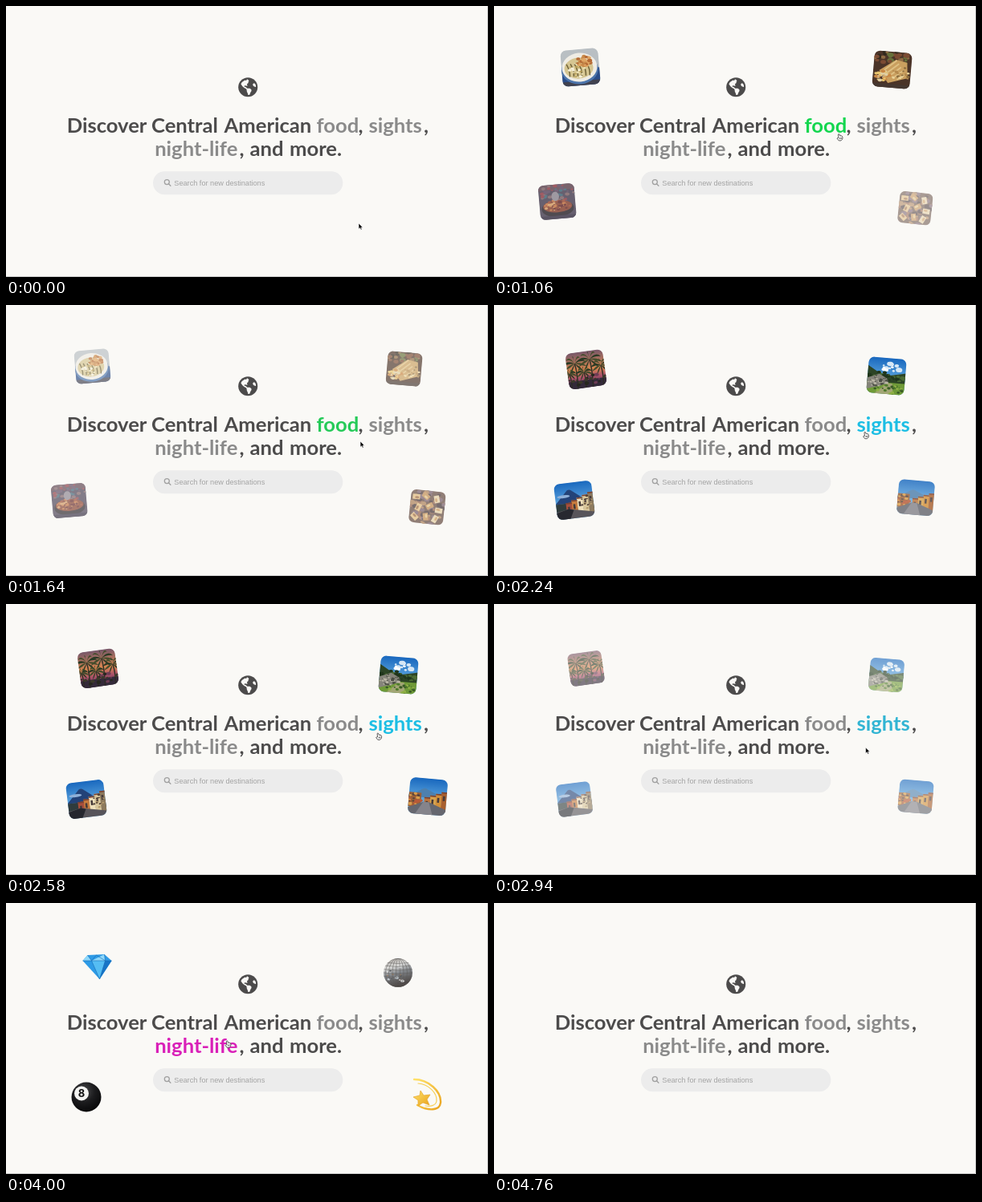
These frames come from a looping animation (600x338 px, 5 s). An HTML page:

```html
<!DOCTYPE html>
<html lang="en">
<head>
<meta charset="utf-8">
<title>Discover</title>
<style>
  html, body { margin: 0; width: 100%; height: 100%; overflow: hidden; background: #faf9f6; }
  svg { display: block; width: 600px; height: 338px; }
  .title { font: 700 25.6px Lato, sans-serif; fill: #4c4b4b; }
  .hint { font: 9.16px "Liberation Sans", Arial, sans-serif; fill: #a3a3a3; }
</style>
</head>
<body>
<svg viewBox="0 0 600 338">
  <defs>
    <clipPath id="card"><rect x="-23.5" y="-22.5" width="47" height="45" rx="7"/></clipPath>
    <clipPath id="ball"><circle r="18"/></clipPath>
    <linearGradient id="sunset" x2="0" y2="1">
      <stop stop-color="#75566a"/><stop offset=".5" stop-color="#d98650"/><stop offset=".72" stop-color="#a9506a"/><stop offset="1" stop-color="#3a2c40"/>
    </linearGradient>
    <linearGradient id="sky" x2="0" y2="1"><stop stop-color="#1766bd"/><stop offset=".7" stop-color="#6cb4e6"/></linearGradient>
    <linearGradient id="chrome" x2=".3" y2="1">
      <stop stop-color="#a9a39d"/><stop offset=".35" stop-color="#dcdcda"/><stop offset=".6" stop-color="#82868b"/><stop offset="1" stop-color="#4a4442"/>
    </linearGradient>
    <radialGradient id="black" cx=".4" cy=".3" r=".75"><stop stop-color="#4a4a4c"/><stop offset=".5" stop-color="#1c1c1e"/><stop offset="1" stop-color="#050506"/></radialGradient>
    <linearGradient id="gold" x2="1" y2="1"><stop stop-color="#ffe26a"/><stop offset="1" stop-color="#e9a21c"/></linearGradient>
  </defs>

  <path d="M599.5 0V337.5H0" fill="none" stroke="#c6c6c6"/>

  <g transform="translate(289.2 89.3) scale(.0484) translate(0 -8)">
    <circle cx="248" cy="256" r="248" fill="#4c4b4b"/>
    <path fill="#faf9f6" d="M330 366L313 388 291 451 248 456V429L225 377 216 355V323L199 295 151 269 119 247 100 225 66 174Q100 105 169 72L193 84 216 70V59L240 56 269 85V107L254 122 258 146 236 160 220 176 235 212 222 224 187 211 155 221 147 232 195 256 227 288H294L330 311 339 333ZM409 150L377 169 374 200 388 226 412 240 447 249 455 230 438 177Z"/>
  </g>

  <g class="title">
    <text x="75.7" y="158.4">Discover</text>
    <text x="181" y="158.4">Central</text>
    <text x="271.6" y="158.4">American</text>
    <text x="386.5" y="158.4"><tspan class="word">food</tspan><tspan x="438.6">,</tspan></text>
    <text x="451.5" y="158.4"><tspan class="word">sights</tspan><tspan x="520">,</tspan></text>
    <text x="185.2" y="187.4"><tspan class="word">night-life</tspan><tspan x="290.6">,</tspan></text>
    <text x="303.5" y="187.4">and</text>
    <text x="353" y="187.4">more.</text>
  </g>

  <rect x="183" y="206.3" width="236.3" height="28.9" rx="14.4" fill="#ececec"/>
  <g fill="none" stroke="#a0a0a0" stroke-width="1.3" stroke-linecap="round">
    <circle cx="200.3" cy="219.6" r="3"/><path d="M202.6 222L204.9 224.3"/>
  </g>
  <text class="hint" x="209.3" y="223.6">Search for new destinations</text>

  <g id="items"></g>

  <g id="cursor">
    <path id="arrow" d="M0 0V7.2L1.7 5.7 2.8 8.2 4.1 7.6 3 5.2H5.2Z" fill="#000" stroke="#fff" stroke-width=".6"/>
    <path id="hand" d="M-1.5 .4Q-.7-.5 0 .4L.8 2.4 2.4 2.2 3.4 2.8 4 4.6 3.6 6.6 2 8.3H-.8L-2.9 5.6Q-2.6 4.5-1.1 4.9ZM.6 4.6V6.6M2.2 4.4V6.4" fill="#fff" stroke="#333" stroke-width=".8"/>
  </g>
</svg>

<script>
const $ = id => document.getElementById(id);
const LOOP = 5000, GRAY = [138, 138, 138];

// Shape helpers
const rect = (x, y, w, h, fill) => `<rect x="${x}" y="${y}" width="${w}" height="${h}" fill="${fill}"/>`;
const oval = (x, y, rx, ry, fill) => `<ellipse cx="${x}" cy="${y}" rx="${rx}" ry="${ry}" fill="${fill}"/>`;
const path = (d, fill, more = "") => `<path d="${d}" fill="${fill}" ${more}/>`;
const card = (back, ...shapes) => `<g clip-path="url(#card)">${rect(-24, -23, 48, 46, back)}${shapes.join("")}</g>`;

// Scattered blobs inside an ellipse, seeded
function specks(count, x, y, rx, ry, size, colors, seed = 7) {
  const rand = () => (seed = seed * 16807 % 2147483647) / 2147483647;
  rand();
  let out = "";
  for (let i = 0; i < count; i++) {
    const a = rand() * 6.283, r = Math.sqrt(rand()), s = size * (.5 + rand());
    out += oval((x + Math.cos(a) * r * rx).toFixed(1), (y + Math.sin(a) * r * ry).toFixed(1), s.toFixed(1), (s * .7).toFixed(1), colors[i % colors.length]);
  }
  return out;
}

function palm(x, y, size) {
  let out = path(`M${x} ${y}Q${x + 2} ${y + 12} ${x} 24`, "none", 'stroke="#2c2a25" stroke-width="1.4"');
  for (let i = 0; i < 10; i++) {
    const a = i * .628 + .2, dx = Math.cos(a) * size, dy = Math.sin(a) * size * .7;
    out += path(`M${x} ${y}q${dx * .6} ${dy - 4} ${dx} ${dy + 3}q${-dx * .5} -2 ${-dx} ${-dy - 3}`, i % 2 ? "#2a3a24" : "#454d2c");
  }
  return out;
}

function houses(colors, top) {
  return colors.map((c, i) => {
    const x = 24 - i * 7, y = top + i * 2.6;
    return rect(x - 7, y, 7.3, 18 - i * 2.6 - top, c) + rect(x - 7, y, 7.3, 1.6, "#7a4232") + rect(x - 5, y + 5, 2.6, 6, "#453a3a");
  }).join("");
}

const pasta = card("#b9bfc3",
  rect(-24, 2, 48, 22, "#2a4c88"), rect(-24, 17, 48, 7, "#41424f"),
  oval(-1, 3, 23, 18, "#4b74ab"), oval(-1, 0, 22, 18, "#efece4"), oval(-2, 1, 18, 13, "#d5c591"),
  ...[-14, -9, -4, 1, 6, 11].map(x => path(`M${x - 3} -5Q${x + 1} 3 ${x} 11`, "none", 'stroke="#6f6238" stroke-width="1.5"')),
  specks(26, -4, 3, 13, 9, 1.5, ["#efe3b4", "#b89e55", "#f5efd8"], 3),
  specks(30, 5, -7, 9, 7, 2.2, ["#c98a4a", "#e0a563", "#b56a35"], 21));

const corn = card("#4a3327",
  specks(36, 0, -13, 24, 11, 3, ["#30281c", "#66703a", "#7a4a32", "#8e6a42"], 5),
  path("M-16 2L4-13 18-10 20 9-4 17Z", "#c99f5e"),
  ...[0, 1, 2, 3, 4].map(i => path(`M${-13 + i * 5} ${4 + i * 2}L${5 + i * 3} ${-12 + i * 4}`, "none", 'stroke="#dfc184" stroke-width="1.7"')),
  specks(30, -12, 7, 9, 8, 2, ["#e8c56e", "#c98844", "#dfcfa4"], 33), specks(18, 10, 5, 12, 10, 1.6, ["#b58a4d", "#ead39a", "#8a6a3c"], 12), rect(-24, 18, 48, 6, "#44362f"));

const bowl = card("#473f52",
  rect(-24, -23, 48, 8, "#5d4450"), specks(50, 0, -9, 24, 13, 2.2, ["#8c3a43", "#3d6273", "#5b4760", "#7a5f63"], 9),
  oval(0, 9, 21, 11, "#2b252c"), oval(0, 6, 19, 8, "#84402f"),
  specks(38, 0, 5, 17, 7, 1.8, ["#c0713f", "#63282a", "#d29a63", "#9b4a35"], 15), oval(-2, -7, 5, 6, "#8b848f"), rect(-24, 18, 48, 5, "#373044"));

const snacks = card("#5c4238",
  specks(70, 0, 0, 25, 24, 3.2, ["#8e5a42", "#39282b", "#a87a50", "#6f5563"], 3),
  ...[[-16, -13], [-3, -15], [12, -12], [-12, 1], [3, -2], [16, 3], [-16, 14], [-1, 13], [12, 15]].map(([x, y], i) =>
    `<g transform="translate(${x} ${y}) rotate(${i * 37})">${rect(-5, -3.5, 10, 7, ["#dfb878", "#c08a4c", "#e3cda0"][i % 3])}${oval(1, 1, 2.8, 1.6, ["#9a6337", "#e0bf7e", "#c79355"][i % 3])}</g>`));

const beach = card("url(#sunset)", rect(-24, 13, 48, 11, "#342a3a"), palm(-13, -9, 15), palm(6, -12, 16), palm(19, -3, 13), palm(-3, 3, 11), palm(-21, 3, 9),
  specks(24, 0, 12, 24, 7, 2, ["#27281f", "#6d3d54", "#3d3a2a"], 2));

const ruins = card("url(#sky)",
  specks(14, 6, -11, 14, 5, 2.8, ["#fff", "#d6e7f5"], 11),
  path("M-24-12L-12-5 0 0 24-5V10H-24Z", "#2c4425"), specks(34, 2, 1, 24, 6, 2.2, ["#1f351b", "#4a6a33"], 4),
  rect(-24, 8, 48, 16, "#6f9a38"), path("M-24 18V4L-16 1-9-2 1 3 3 9-8 13Z", "#85847a"), specks(34, -11, 7, 13, 7, 1.6, ["#bab6a6", "#4c5045"], 8),
  path("M-14 23L2 9 8 9 10 23Z", "#a3a676"), specks(30, 5, 17, 18, 6, 1.6, ["#4f7a2c", "#8fb045", "#395a26"], 13));

const volcano = card("url(#sky)",
  path("M-24 3L-8-13Q-5-15-2-12L18 4Z", "#234278"), oval(-13, -6, 8, 2, "#8fb0d8"),
  rect(-24, 3, 48, 10, "#2f3b3c"), houses(["#8d7a5d", "#d9c79c", "#efe0ba", "#c77b3d", "#a84e3c"], -8),
  specks(16, 14, 4, 10, 8, 1.4, ["#54443a", "#b59a6c"], 5),
  path("M-24 13L-8 10 24 17V24H-24Z", "#57545a"), path("M-24 14L-8 10-2 12-8 24H-24Z", "#26272f"));

const street = card("url(#sky)",
  path("M-24 1L-7-9Q-4-11-1-9L24 2Z", "#4d80ae"),
  houses(["#a9602f", "#d3903a", "#d9a24b", "#b9743d"], -7), rect(-24, -4, 16, 18, "#9a6038"), specks(24, -16, 5, 8, 8, 1.8, ["#d99c48", "#54443d", "#b85a38"], 18),
  path("M-24 15L-5 7 2 7 24 15V24H-24Z", "#66676f"), path("M-5 7H2L8 24H-15Z", "#85848b"));

const diamond = path("M-18-7L-12-14 9-15 18-7 3 16Z", "#2e9be6") +
  path("M-12-14L-7-7-18-7ZM9-15L10-7-7-7Z", "#8fd8fa") + path("M-7-7H10L3 16Z", "#55bdf3") + path("M10-7H18L3 16Z", "#1874c6") +
  path("M-18-7H18M-12-14L-7-7 3 16 10-7 9-15M-7-7L-1-14 10-7", "none", 'stroke="#176bb4" stroke-width=".6"');

const disco = `<circle r="18" fill="url(#chrome)"/><g clip-path="url(#ball)">` +
  specks(14, 0, 2, 14, 13, 1.6, ["#eef0f0", "#96816e", "#55585c", "#c3cbd2"], 6) +
  `<g fill="none" stroke="#5d5a58" stroke-width=".5">` +
  [2.5, 7, 11.5, 15.5].map(r => `<ellipse rx="${r}" ry="18"/>`).join("") +
  [-13, -9, -4.5, 0, 4.5, 9, 13].map(y => `<path d="M-18 ${y}Q0 ${y + 3} 18 ${y}"/>`).join("") + "</g></g>";

const eight = `<circle r="18.5" fill="url(#black)"/><circle cx="-6" cy="-4.5" r="9" fill="#f4f4f2"/>
  <text x="-6" y=".2" text-anchor="middle" style="font:700 13px Inter,sans-serif" fill="#111">8</text>`;

const dizzy = path("M-16-19C2-19 18-4 17 10C16 20 2 21-12 13", "none", 'stroke="url(#gold)" stroke-width="2.4" stroke-linecap="round"') +
  path("M-11-14C2-13 13-2 12 8C11 14 4 15-2 14", "none", 'stroke="#f6cf55" stroke-width="1.2" stroke-linecap="round"') +
  path("M-8-5L-4 1 4 0 0 6 3 13-5 10-11 14-11 7-17 3-9 1Z", "url(#gold)", 'stroke="#e5a72c" stroke-width=".7" stroke-linejoin="round"');

// Hover spans; each item is x, y, angle, drawing
const topics = [
  { from: 825, to: 1540, color: [18, 214, 78], items: [[107.5, 76.4, -5, pasta], [495.6, 79.5, 5, corn], [78.7, 244, -5, bowl], [524.3, 252.2, 6, snacks]] },
  { from: 1960, to: 2830, color: [28, 190, 228], items: [[114.5, 80.3, -8, beach], [488.5, 88.5, 5, ruins], [100, 243.5, -7, volcano], [525, 240.2, 5, street]] },
  { from: 3380, to: 4360, color: [217, 31, 184], items: [[113.5, 79, 0, diamond], [488, 87, 0, disco], [100, 242, 0, eight], [524, 239, 0, dizzy]] }
];
$("items").innerHTML = topics.flatMap(t => t.items).map(i => `<g>${i[3]}</g>`).join("");
const nodes = $("items").children, words = document.querySelectorAll(".word");

// Cursor stops: time, x, y
const route = [[0, 439, 271], [300, 439, 271], [820, 434, 171], [1060, 430, 159.6], [1400, 432, 160], [1640, 441, 170], [1940, 452, 171],
  [2240, 462.5, 158.4], [2700, 464, 162], [2940, 463, 179], [3380, 289, 180], [4000, 276, 172], [4330, 277, 176], [4640, 378, 274], [4760, 420, 339], [5000, 420, 345]];

const ease = x => { x = Math.min(1, Math.max(0, x)); return x * x * (3 - 2 * x); };
const level = (t, { from, to }, delay, rise, fall) => ease((t - from - delay) / rise) * (1 - ease((t - to) / fall));

function draw() {
  const t = performance.now() % LOOP;
  topics.forEach((topic, k) => {
    const tint = level(t, topic, 0, 150, 400);
    words[k].setAttribute("fill", `rgb(${GRAY.map((g, i) => Math.round(g + (topic.color[i] - g) * tint))})`);
    topic.items.forEach(([x, y, angle], i) => {
      const shown = level(t, topic, i * 45, 200, 260), node = nodes[k * 4 + i];
      node.setAttribute("opacity", shown);
      node.setAttribute("transform", `translate(${x} ${y}) rotate(${angle}) scale(${.75 + .25 * shown})`);
    });
  });

  const n = route.findIndex(p => p[0] > t), [t0, x0, y0] = route[n - 1], [t1, x1, y1] = route[n], f = (t - t0) / (t1 - t0);
  $("cursor").setAttribute("transform", `translate(${x0 + (x1 - x0) * f} ${y0 + (y1 - y0) * f})`);
  const hover = topics.some(s => t >= s.from && t < s.to);
  $("hand").setAttribute("visibility", hover ? "visible" : "hidden");
  $("arrow").setAttribute("visibility", hover ? "hidden" : "visible");
  requestAnimationFrame(draw);
}
draw();
</script>
</body>
</html>
```
